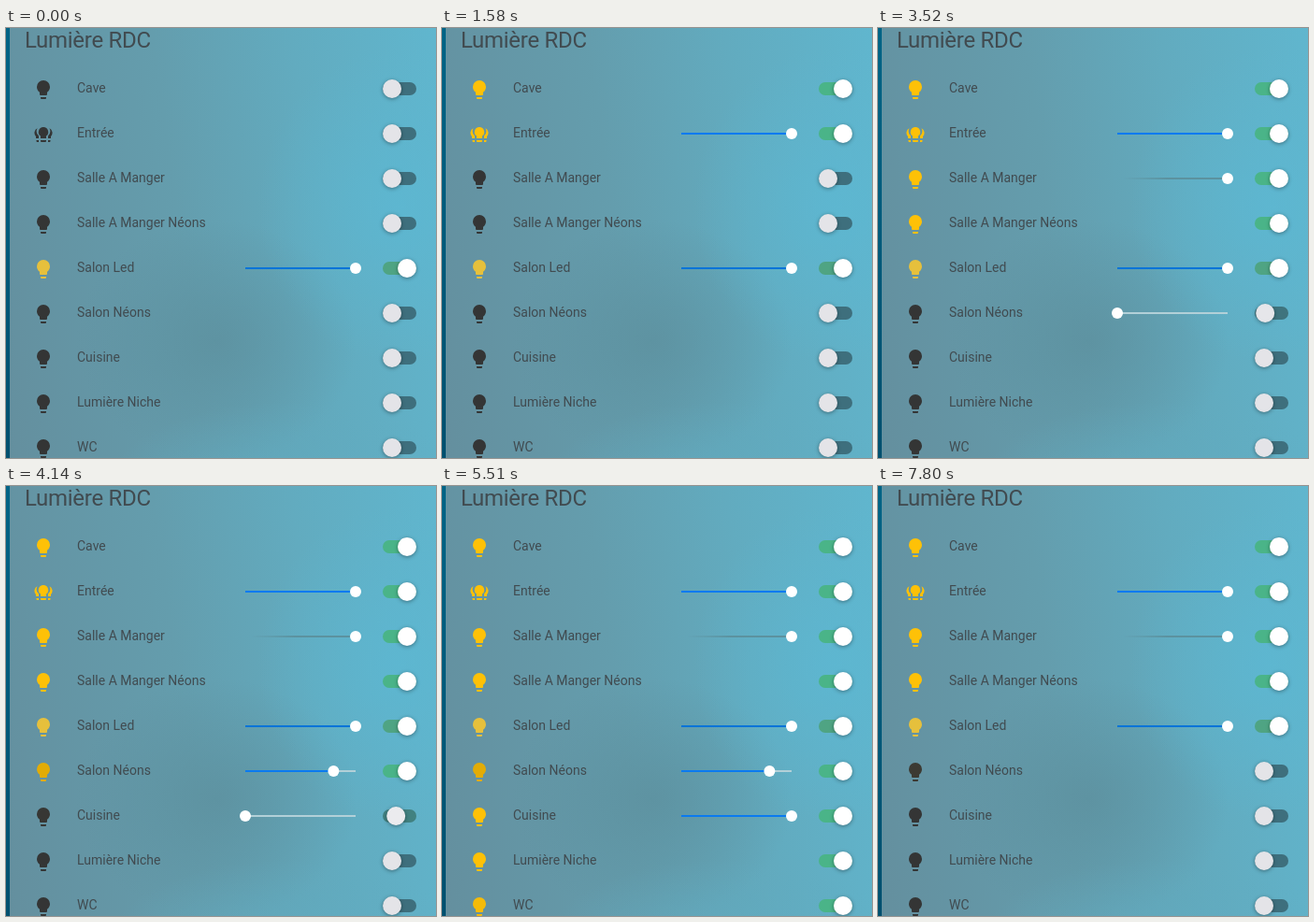
An HTML page for the animation above (8000 ms loop, 460 px wide and 460 px high).

```html
<!DOCTYPE html>
<html lang="fr">
<head>
<meta charset="utf-8">
<title>Lumière RDC</title>
<style>
  html, body { margin: 0; width: 100%; height: 100%; overflow: hidden; }
  .card {
    position: relative; width: 460px; height: 460px; overflow: hidden;
    font: 14px/20px Roboto, sans-serif; color: #414b50;
    background:
      radial-gradient(150px 170px at 420px 190px, rgba(92, 184, 211, .75), transparent),
      radial-gradient(190px 90px at 300px 490px, rgba(96, 172, 193, .7), transparent),
      radial-gradient(150px 130px at 225px 335px, rgba(92, 143, 157, .75), transparent),
      linear-gradient(82deg, #648f9e 0%, #649dad 42%, #62abbf 70%, #60b6ce 100%);
  }
  .edge {
    position: absolute; left: 0; top: 0; width: 4px; height: 100%;
    background: linear-gradient(#006486, #00506f);
  }
  h1 {
    position: absolute; left: 20px; top: -3px; margin: 0;
    font-size: 24px; font-weight: 400; line-height: 32px; letter-spacing: -.012em;
  }
  .row { position: absolute; left: 0; width: 460px; height: 48px; }
  .row > * { position: absolute; }
  .icon { left: 28px; top: 13px; width: 24px; height: 24px; }
  .name { left: 76px; top: 13px; white-space: nowrap; }
  .slider { left: 256px; top: 23px; width: 118px; height: 2px; }
  .slider > * { position: absolute; }
  .rest { right: 0; height: 2px; background: #b2d0d8; }
  .fill { left: 0; height: 2px; background: #0a7af0; }
  .dot { left: -6px; top: -5px; width: 12px; height: 12px; border-radius: 50%; background: #fff; }
  .bar { left: 403px; top: 17px; width: 36px; height: 14px; border-radius: 8px; }
  .knob {
    left: 403px; top: 14px; width: 20px; height: 20px; border-radius: 50%;
    box-shadow: 0 1px 4px rgba(0, 0, 0, .38);
  }
</style>
</head>
<body>
<div class="card">
  <div class="edge"></div>
  <h1>Lumière RDC</h1>
</div>
<script>
const LOOP = 8000, TRACK = 118;
const BULB = "M12 2A7 7 0 0 0 5 9c0 2.38 1.19 4.47 3 5.74V17a1 1 0 0 0 1 1h6a1 1 0 0 0 1-1v-2.26c1.81-1.27 3-3.36 3-5.74a7 7 0 0 0-7-7M9 21a1 1 0 0 0 1 1h4a1 1 0 0 0 1-1v-1H9Z";
const SIDE = "M5.6 5.2A5.5 5.5 0 0 0 4 14v2h3v-2.4A7 7 0 0 1 5.6 5.2ZM4.5 18H7v2H5.5a1 1 0 0 1-1-1Z";
const GROUP = `<path d="M12 4a5.3 5.3 0 0 0-3 9.6V16h6v-2.4A5.3 5.3 0 0 0 12 4M9 18h6v1a1 1 0 0 1-1 1h-4a1 1 0 0 1-1-1Z"/>
  <path d="${SIDE}"/><path d="${SIDE}" transform="matrix(-1 0 0 1 24 0)"/>`;

const OFF = { icon: [52, 53, 53], bar: [62, 111, 125], knob: [228, 228, 232] };
const ON = { icon: [254, 193, 7], bar: [74, 180, 136], knob: [255, 255, 255] };

// on/off: switching times; level: slider value; lag: delay before the slider moves
const lights = [
  { name: "Cave", on: 480 },
  { name: "Entrée", on: 1270, level: 1, lag: 140, group: true },
  { name: "Salle A Manger", on: 1970, level: 1, lag: 220, faint: true },
  { name: "Salle A Manger Néons", on: 2770 },
  { name: "Salon Led", on: -LOOP, level: 1, lag: 0, icon: [230, 192, 60], bar: [79, 164, 131], fill: "#0874d8" },
  { name: "Salon Néons", on: 3515, off: 7540, level: .8, lag: 165, dim: .89 },
  { name: "Cuisine", on: 4120, off: 7080, level: 1, lag: 220 },
  { name: "Lumière Niche", on: 4770, off: 6725 },
  { name: "WC", on: 5250, off: 6245 }
];

const ramp = (t, start, span) => Math.min(1, Math.max(0, (t - start) / span));
const smooth = p => p * p * (3 - 2 * p);
const mix = (a, b, p) => `rgb(${a.map((v, i) => Math.round(v + (b[i] - v) * p))})`;

function add(parent, cls, html = "") {
  const el = document.createElement("div");
  el.className = cls;
  el.innerHTML = html;
  return parent.appendChild(el);
}

function build(light, i) {
  const row = add(document.querySelector(".card"), "row");
  row.style.top = 41 + i * 48 + "px";
  const shape = light.group ? GROUP : `<path d="${BULB}"/>`;
  light.iconEl = add(row, "icon", `<svg width="24" height="24" viewBox="0 0 24 24" fill="currentColor">${shape}</svg>`);
  add(row, "name", light.name);
  if (light.level) {
    light.slider = add(row, "slider");
    light.rest = add(light.slider, "rest");
    light.fillEl = add(light.slider, "fill");
    light.dot = add(light.slider, "dot");
    if (light.fill) light.fillEl.style.background = light.fill;
    if (light.faint) light.fillEl.style.background = "linear-gradient(90deg, transparent 5%, #5c929f 45%)";
  }
  light.barEl = add(row, "bar");
  light.knob = add(row, "knob");
}

function draw(light, t) {
  const { on, off = Infinity } = light;
  const state = span => ramp(t, on, span) - ramp(t, off, span);
  const flip = state(80);
  light.barEl.style.background = mix(OFF.bar, light.bar || ON.bar, flip);
  light.knob.style.background = mix(OFF.knob, ON.knob, flip);
  light.knob.style.transform = `translateX(${16 * flip}px)`;

  const glow = smooth(ramp(t, on, 300)) - smooth(ramp(t, off, 300));
  const dim = 1 - (1 - (light.dim || 1)) * smooth(ramp(t, on + (light.lag || 0), 300));
  const lit = (light.icon || ON.icon).map(v => v * dim);
  light.iconEl.style.color = mix(OFF.icon, lit, glow);

  if (!light.slider) return;
  const x = TRACK * light.level * ramp(t, on + light.lag, 80);
  light.slider.style.visibility = t >= on && t < off ? "visible" : "hidden";
  light.fillEl.style.width = x + "px";
  light.rest.style.width = TRACK - x + "px";
  light.dot.style.transform = `translateX(${x}px)`;
}

lights.forEach(build);
const begin = performance.now();
function frame() {
  const t = (performance.now() - begin) % LOOP;
  lights.forEach(light => draw(light, t));
  requestAnimationFrame(frame);
}
frame();
</script>
</body>
</html>
```
